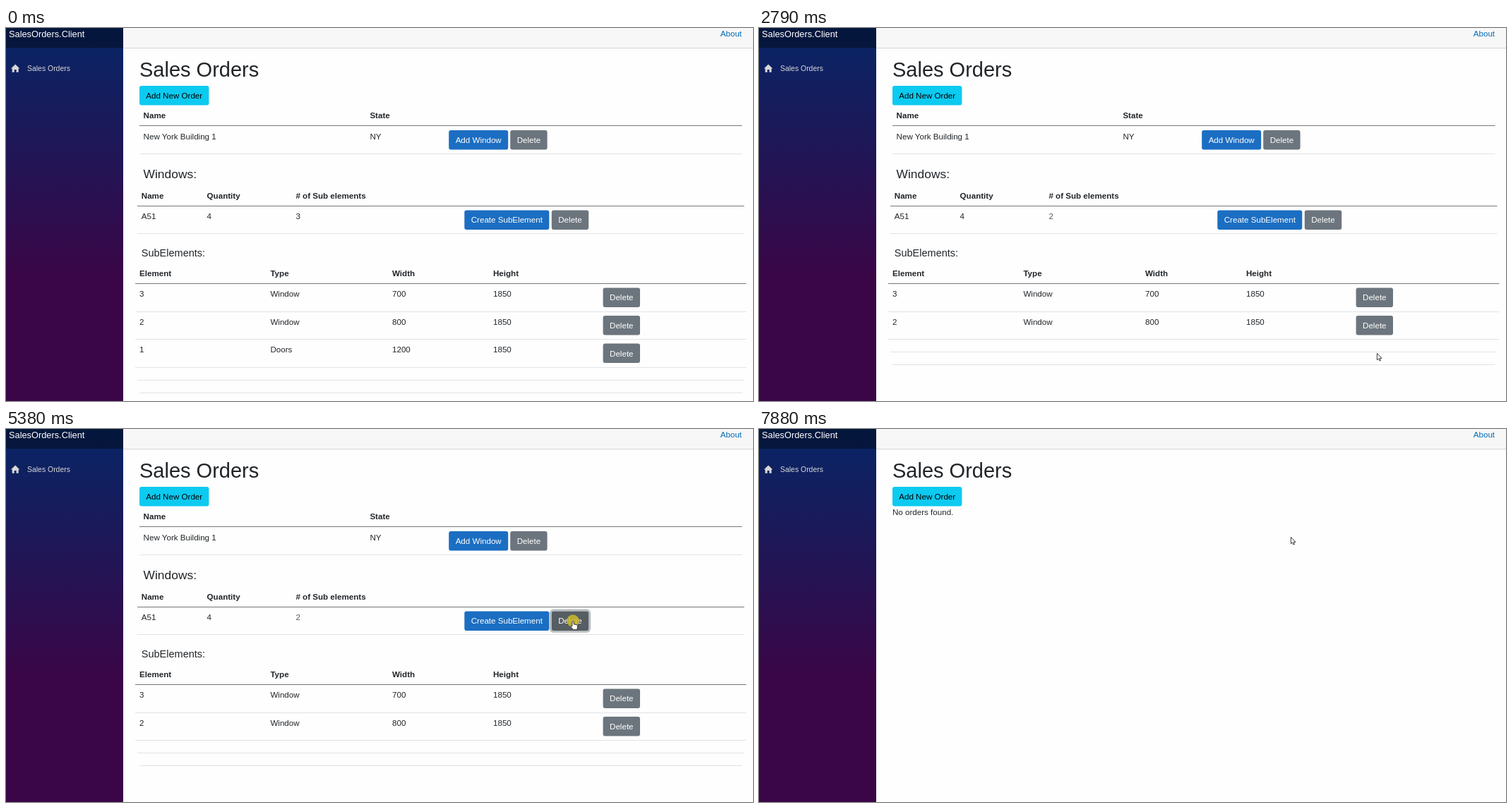
These frames come from a looping animation (1058 px wide and 529 px high, 8 s). An HTML page:

```html
<!DOCTYPE html>
<html lang="en">
<head>
<meta charset="utf-8">
<title>Sales Orders</title>
<style>
html, body { margin: 0; width: 100%; height: 100%; overflow: hidden; background: #fefefe; }
body { position: relative; }
aside { position: absolute; left: 0; top: 0; width: 166px; height: 100%;
  background: linear-gradient(180deg, rgb(5,39,103) -12px, #3a0647 352px); }
aside::before { content: ""; display: block; height: 28px; background: rgba(0,0,0,.4); }
header { position: absolute; left: 166px; right: 0; top: 0; height: 28px;
  background: #f7f7f7; border-bottom: 1px solid #d6d5d5; }
svg { position: absolute; left: 0; top: 0; width: 100%; height: 100%; }
text { font: 11.6px "Liberation Sans", Arial, sans-serif; fill: #212529; white-space: pre; }
.bold { font-weight: bold; }
.link { fill: #006bb7; }
.light { fill: #fff; }
.brand { font-size: 12.8px; fill: #fff; }
.nav { font-size: 10.44px; fill: #d7d7d7; }
.h1 { font-size: 29px; }
.h4 { font-size: 17.4px; }
.h5 { font-size: 14.5px; }
.head { fill: #74777a; }
.rule { fill: #e0e3e6; }
.btn text { text-anchor: middle; }
.info rect { fill: #0dcaf0; }
.info text { fill: #000; }
.blue { fill: #1b6ec2; }
.grey { fill: #6c757d; }
.hover .blue { fill: #0b5ed7; }
.hover .grey { fill: #5c636a; }
.press .grey { fill: #565e64; }
.ring { fill: none; stroke: rgba(130,138,145,.55); stroke-width: 2.9; visibility: hidden; }
.press .ring { visibility: inherit; }
.pointer { fill: #fff; stroke: #1a1a1a; stroke-width: .85; stroke-linejoin: round; }
</style>
</head>
<body>
<aside></aside>
<header></header>
<svg id="stage" viewBox="0 0 1058 529"></svg>
<script>
const LOOP = 8000, STEP = 68;
const NS = "http://www.w3.org/2000/svg";
const stage = document.getElementById("stage");

function add(parent, tag, attrs = {}, content = "") {
  const el = document.createElementNS(NS, tag);
  for (const key in attrs) el.setAttribute(key, attrs[key]);
  el.textContent = content;
  parent.appendChild(el);
  return el;
}
const group = parent => add(parent, "g");
const label = (parent, x, y, content, cls = "") =>
  add(parent, "text", { x, y, class: cls }, content);
const rule = (parent, inset, y, cls = "rule") =>
  add(parent, "rect", { x: 189 - inset, y, width: 853.5 + 2 * inset, height: 1, class: cls });

function button(parent, x, y, width, content, color, textClass = "light") {
  const g = add(parent, "g", { class: "btn " + (color || "info") });
  g.classList.remove("blue", "grey");
  add(g, "rect", { x: x - 1.45, y: y - 1.45, width: width + 2.9, height: 30.4, rx: 4.2, class: "ring" });
  add(g, "rect", { x, y, width, height: 27.5, rx: 2.9, class: color });
  label(g, x + width / 2, y + 18, content, textClass);
  return { g, x, y, width };
}
const remover = (parent, x, y) => button(parent, x, y, 52.4, "Delete", "grey");

// Fixed page parts
label(stage, 4, 12.9, "SalesOrders.Client", "brand");
label(stage, 1011.8, 12.3, "About", "link");
label(stage, 30, 61.1, "Sales Orders", "nav");
add(stage, "path", { fill: "#d7d7d7",
  d: "M13.2 51.5L7 57.5h1.7v5.3h3.1v-3.7h2.8v3.7h3.1v-5.3h1.7z" });
label(stage, 189, 69, "Sales Orders", "h1");
button(stage, 189, 82, 98.4, "Add New Order", "", "");
const empty = label(stage, 189, 122.3, "No orders found.");

// Orders
const orders = group(stage);
label(orders, 194.6, 128.1, "Name", "bold");
label(orders, 515.4, 128.1, "State", "bold");
rule(orders, 0, 138, "head");
label(orders, 194.6, 157.9, "New York Building 1");
label(orders, 515.4, 157.9, "NY");
rule(orders, 0, 178);
const addWindow = button(orders, 627.2, 145, 84, "Add Window", "blue");
const dropOrder = remover(orders, 714.2, 145);

// Windows
const windows = group(stage);
label(windows, 194.6, 212.6, "Windows:", "h4");
label(windows, 191.8, 241.7, "Name", "bold");
label(windows, 284.6, 241.7, "Quantity", "bold");
label(windows, 410.4, 241.7, "# of Sub elements", "bold");
rule(windows, 3, 252, "head");
label(windows, 191.8, 271.3, "A51");
label(windows, 284.6, 271.3, "4");
const count = label(windows, 410.6, 271.3, "3");
rule(windows, 3, 291);
const addPart = button(windows, 649.3, 258.4, 120, "Create SubElement", "blue");
const dropWindow = remover(windows, 772.8, 258.4);

// Sub elements
label(windows, 191.8, 323.7, "SubElements:", "h5");
const columns = [189, 374.4, 547, 690];
const fillRow = (parent, y, cells, cls) =>
  cells.forEach((cell, i) => label(parent, columns[i], y, cell, cls));
fillRow(windows, 351.7, ["Element", "Type", "Width", "Height"], "bold");
rule(windows, 6, 362, "head");
const parts = [["3", "Window", "700"], ["2", "Window", "800"], ["1", "Doors", "1200"]].map((cells, i) => {
  const g = group(windows), y = 362 + i * 39.55;
  fillRow(g, y + 19.3, [...cells, "1850"]);
  rule(g, 6, Math.round(y + 39.55));
  return { g, drop: remover(g, 845.6, y + 6.4) };
});
const tail = group(windows);
rule(tail, 3, 499);
rule(tail, 0, 517);

// Pointer
const spot = add(stage, "circle", { r: 8.7, fill: "#cbb928", "fill-opacity": .85 });
const arrow = add(stage, "path", { class: "pointer",
  d: "M.4 .4V9.8L2.6 7.9 4 11.1 5.5 10.4 4.1 7.3H7z" });
const hand = add(stage, "path", { class: "pointer",
  d: "M-1.1 1.2Q0 -.6 1.1 1.2V4.8L5.4 5.8Q6.9 6.3 6.7 8L5.8 12.7H.3L-3.2 8.2Q-3 6.6-1.1 7.9z" });

const partGone = 2640, windowGone = 5510, orderGone = 7880;
const presses = [
  [2380, partGone, parts[2].drop],
  [5250, windowGone, dropWindow],
  [7610, orderGone, dropOrder]
];
const targets = [
  [addWindow, orderGone], [dropOrder, orderGone],
  [addPart, windowGone], [dropWindow, windowGone],
  [parts[2].drop, partGone]
];

// Time, x, y of the pointer tip
const path = [
  [490, 1010, 497], [800, 989, 461], [1100, 968, 426], [1180, 964, 431],
  [1313, 964, 431], [1860, 882, 462], [1930, 866, 462], [2050, 875, 461],
  [3042, 875, 461], [3480, 795, 360], [3860, 720, 272],
  [4180, 790, 283], [4420, 839, 271], [4500, 839, 271], [4850, 803, 272],
  [5965, 803, 272], [6390, 660, 267], [6720, 807, 121], [6790, 804, 122],
  [7280, 753, 153], [LOOP, 753, 153]
];

function pointerAt(t) {
  const i = Math.max(1, path.findIndex(p => p[0] > t));
  const [t0, x0, y0] = path[i - 1], [t1, x1, y1] = path[i];
  const steps = Math.max(1, Math.round((t1 - t0) / STEP));
  const k = Math.floor((t - t0) / (t1 - t0) * steps) / steps;
  return [x0 + (x1 - x0) * k, y0 + (y1 - y0) * k];
}
const show = (el, on) => { el.style.visibility = on ? "inherit" : "hidden"; };

function render(t) {
  show(orders, t < orderGone);
  show(empty, t >= orderGone);
  show(windows, t < windowGone);
  const removed = t >= partGone;
  show(parts[2].g, !removed);
  tail.setAttribute("transform", `translate(0 ${removed ? -40 : 0})`);
  count.textContent = removed ? 2 : 3;
  count.style.fill = removed ? "#54585c" : "";

  const [x, y] = pointerAt(t), visible = t >= 490;
  const press = presses.find(p => t >= p[0] && t < p[1]);
  let over = false;
  for (const [b, end] of targets) {
    const hit = visible && t < end && x >= b.x && x <= b.x + b.width && y >= b.y && y <= b.y + 27.5;
    over = over || hit;
    b.g.classList.toggle("hover", hit && b !== parts[2].drop);
    b.g.classList.toggle("press", !!press && press[2] === b);
  }
  const move = `translate(${x} ${y})`;
  for (const el of [spot, arrow, hand]) el.setAttribute("transform", move);
  show(spot, !!press);
  show(hand, visible && over);
  show(arrow, visible && !over);
}

function tick() {
  render(performance.now() % LOOP);
  requestAnimationFrame(tick);
}
tick();
</script>
</body>
</html>
```
